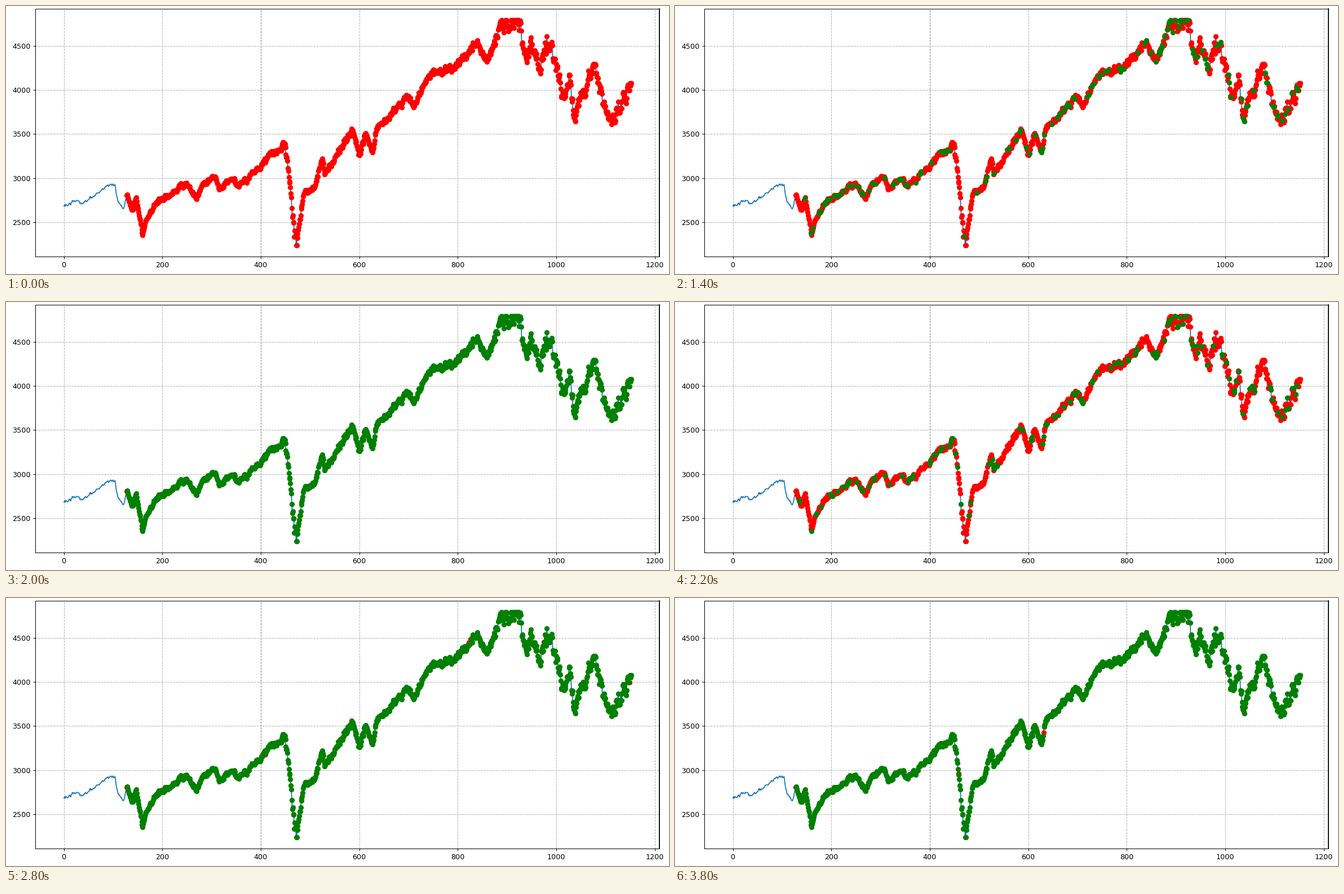
Animation, 1176 px wide and 476 px high, one loop 4000 ms. Source, as a matplotlib script:

```python
import numpy as np
import matplotlib.pyplot as plt
from matplotlib.animation import FuncAnimation

W, H, DPI = 1176, 476, 112
PX = 72 / DPI                      # one pixel in points
DAYS, FIRST = 1153, 128            # curve length, first day with a signal
LOW, HIGH = 2237.4, 4796.6

# Main turning points of the curve: (day, price)
TURNS = [
    (0, 2680), (28, 2745), (36, 2705), (95, 2930), (104, 2925), (110, 2730),
    (121, 2650), (129, 2814), (140, 2640), (147, 2780), (160, 2351),
    (165, 2500), (188, 2730), (249, 2945), (269, 2760), (282, 2940),
    (307, 3015), (315, 2870), (342, 2990), (356, 2900), (430, 3310),
    (449, 3386), (472, LOW), (487, 2820), (508, 2880), (525, 3220),
    (530, 3040), (586, 3550), (600, 3260), (613, 3510), (627, 3290),
    (635, 3560), (698, 3920), (711, 3800), (741, 4170), (790, 4240),
    (838, 4530), (859, 4320), (884, 4690), (922, HIGH), (939, 4350),
    (947, 4560), (968, 4190), (981, 4610), (1017, 3920), (1027, 4160),
    (1036, 3690), (1077, 4290), (1112, 3610), (1152, 4080),
]


def make_prices():
    rng = np.random.default_rng(21)
    day = np.arange(DAYS)
    turn_day, turn_price = np.array(TURNS).T
    base = np.interp(day, turn_day, turn_price)

    wobble = np.zeros(DAYS)
    for i in range(1, DAYS):
        wobble[i] = 0.55 * wobble[i - 1] + 0.8 * rng.normal()
    wobble = np.clip(wobble, -2, 2)

    # Calm at first, wild around the crash, restless at the end
    swing = (np.where(day < FIRST, 0.4, 0.6)
             + 2.6 * np.exp(-((day - 466) / 12) ** 2)
             + 0.9 * np.clip((day - 850) / 100, 0, 1)) / 100
    gap = np.abs(day[:, None] - turn_day).min(axis=1)
    price = base * (1 + swing * wobble * np.minimum(gap / 2, 1))
    return day, np.clip(price, LOW, HIGH)


day, price = make_prices()


def signals(seed, share):
    """Random green days; the very first signal stays red."""
    green = np.random.default_rng(seed).random(DAYS) < share
    green[FIRST] = False
    return green


all_red, all_green = signals(0, 0), signals(0, 1)
STEPS = [
    (2, all_red), (5, all_green), (1, signals(7, 0.13)), (1, all_green),
    (1, signals(5, 0.97)), (1, all_green), (1, signals(8, 0.13)),
    (1, signals(2, 0.96)), (1, all_green), (1, signals(9, 0.97)),
    (3, all_green), (1, signals(4, 0.99)), (1, signals(6, 0.99)),
]
states = [green for count, green in STEPS for _ in range(count)]

plt.rcParams["font.family"] = "DejaVu Sans"
fig = plt.figure(figsize=(W / DPI, H / DPI), dpi=DPI, facecolor="white")
left, right, top, bottom = 52.3, 1158.9, 4.7, 444.7
ax = fig.add_axes([left / W, 1 - bottom / H,
                   (right - left) / W, (bottom - top) / H])

pad_x, pad_y = 0.05 * (DAYS - 1), 0.05 * (HIGH - LOW)
ax.set_xlim(-pad_x, DAYS - 1 + pad_x)
ax.set_ylim(LOW - pad_y, HIGH + pad_y)
ax.set_xticks(range(0, 1201, 200))
ax.set_yticks(range(2500, 4501, 500))
ax.tick_params(labelsize=12.8 * PX, length=4.4 * PX, width=PX)
ax.tick_params(axis="x", pad=5.4 * PX)
ax.tick_params(axis="y", pad=4.4 * PX)
ax.set_axisbelow(True)
ax.grid(True, linestyle="--", linewidth=PX, color="#b0b0b0")
ax.get_xgridlines()[2].set_color("#808080")
for spine in ax.spines.values():
    spine.set_linewidth(PX)
ax.spines["right"].set_linewidth(1.8 * PX)

ax.plot(day, price, color="#1f77b4", linewidth=1.8 * PX, zorder=2)


def dots(color, z):
    return ax.plot([], [], "o", color=color, markersize=9.3 * PX,
                   markeredgewidth=0, zorder=z)[0]


red_dots, green_dots = dots("red", 3), dots("green", 4)
active = day >= FIRST


def draw(frame):
    green = states[frame]
    for artist, mask in ((red_dots, ~green), (green_dots, green)):
        shown = mask & active
        artist.set_data(day[shown], price[shown])
    return red_dots, green_dots


anim = FuncAnimation(fig, draw, frames=len(states), interval=200,
                     repeat=True, repeat_delay=0, blit=False)
plt.show()
```
